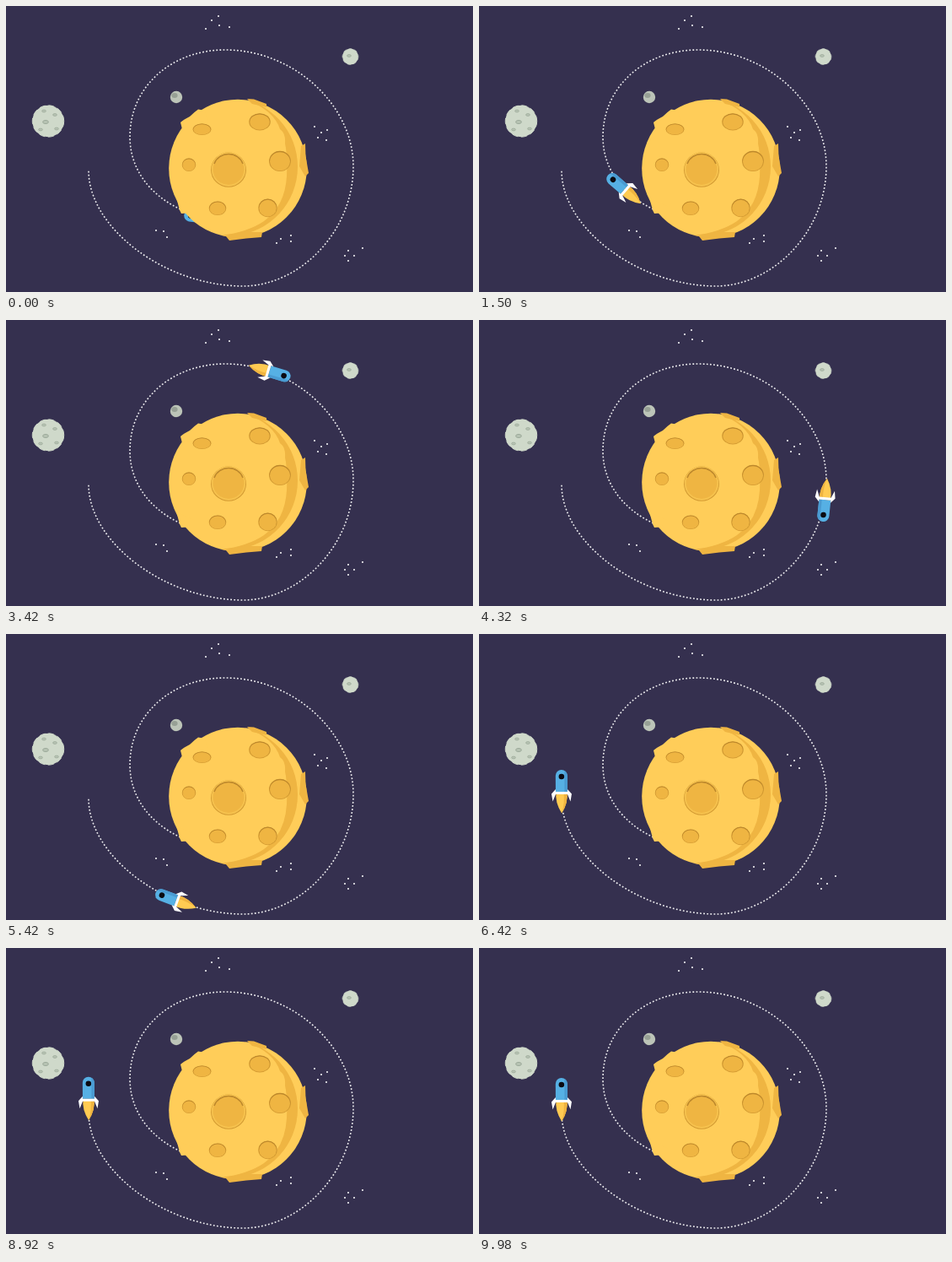
These frames come from a looping animation (554x339 px, 10 s). An HTML page:

```html
<!DOCTYPE html>
<html lang="en">
<head>
<meta charset="utf-8">
<title>Rocket orbit</title>
<style>
  html, body { margin: 0; width: 100%; height: 100%; overflow: hidden; background: #35304f; }
  svg { display: block; width: 100vw; height: 100vh; }
</style>
</head>
<body>
<svg viewBox="0 0 554 339">
  <defs>
    <g id="crater">
      <circle r="10" cy=".4" fill="#d39b33"/>
      <circle r="9.500" cy="-.2" fill="#bd882c"/>
      <circle r="9.200" cy=".6" fill="#efb542"/>
    </g>
    <ellipse id="pit" rx="2.400" ry="1.400" fill="#b9c5b5" stroke="#98a596" stroke-width=".7"/>
  </defs>
  <rect width="554" height="339" fill="#35304f"/>

  <g id="stars" stroke="#fff" stroke-width="2" stroke-linecap="round">
    <path d="M252 12h0M244 17h0M253 23h0M265 25h0M237 27h0"/>
    <path d="M366 143h0M381 147h0M374 150h0M370 156h0M380 159h0"/>
    <path d="M178 266h0M187 267h0M191 274h0"/>
    <path d="M338 272h0M326 276h0M338 279h0M321 281h0"/>
    <path d="M423 287h0M406 290h0M402 296h0M413 296h0M406 302h0"/>
  </g>

  <g id="moons" fill="#cfd9ca">
    <circle cx="50" cy="136.500" r="18.700" stroke="#cfd9ca" stroke-dasharray="7 4"/>
    <use href="#pit" x="45" y="124.500"/>
    <use href="#pit" x="58" y="129"/>
    <use href="#pit" transform="translate(47 137.500) scale(1.400)"/>
    <use href="#pit" x="41" y="146.500"/>
    <use href="#pit" x="60" y="145.500"/>
    <circle cx="408.500" cy="60" r="9.400" stroke="#cfd9ca" stroke-width=".7" stroke-dasharray="4 3"/>
    <use href="#pit" x="407" y="59"/>
    <circle cx="202" cy="108" r="7.200" fill="#bcc4b8"/>
    <ellipse cx="200" cy="106" rx="3.600" ry="3" fill="#97a095"/>
  </g>

  <path id="orbit" fill="none" stroke="#fff" stroke-opacity=".92" stroke-width="1.600" stroke-dasharray="1.800 2.300"
    d="M246 252C230 250 217 247 205 240C170 223 147 193 147 155C147 95 197 52 260 52
       C342 52 412 118 412 190C412 268 348 332 281 332C190 332 98 264 98 195"/>

  <g id="rocket">
    <path fill="#ffcb52" d="M-6.500 -8H6.500Q8 5 0 17.500Q-8 5 -6.500 -8Z"/>
    <path fill="#efb440" d="M2.500 -8H6.500Q8 5 0 17.500Q4 5 2.500 -8Z"/>
    <path fill="#56b0e4" d="M-7 -8V-27A7 7 0 0 1 7 -27V-8Z"/>
    <path fill="#4a9bd2" d="M3.500 -8V-33A7 7 0 0 1 7 -27V-8Z"/>
    <path fill="#fff" d="M-7 -11V-8H7V-11L12 -5.500L10.500 3.500L7 -5H-7L-10.500 3.500L-12 -5.500Z"/>
    <circle cy="-26" r="3.300" fill="#0b0b12"/>
  </g>

  <g id="planet">
    <circle cx="275" cy="192.500" r="81.800" fill="#ffcd59"/>
    <path fill="#ffcd59" d="M209 146L207 138Q210 135 218 131Q223 126 228 122.500L236 124L240 140Z
      M202 227L206 242L208 246L216 245.500L225 238Z"/>
    <path fill="#efb542" d="M286 111.500A82 82 0 0 1 255 272Q287 268 306 255Q331 237 333 202
      Q334 176 331 163Q332 151 325 146Q318 124 286 111.500Z"/>
    <path fill="#efb542" d="M286 110L294 110.500L309 116L309 120L292 116Z
      M350 166L355 163L355.500 178L359 198L355 202L348 190Z
      M304 268L303 274L285 275.500L265 278L261 273L280 268Z"/>
    <use href="#crater" transform="translate(232.500 146) scale(1.100 .670)"/>
    <use href="#crater" transform="translate(301 137) scale(1.280 1)"/>
    <use href="#crater" transform="translate(217 188) scale(.820 .770)"/>
    <use href="#crater" transform="translate(325 183.500) scale(1.300 1.200)"/>
    <use href="#crater" transform="translate(251 239.500) scale(1.030 .820)"/>
    <use href="#crater" transform="translate(310.500 239) scale(1.120 1.070)"/>
    <use href="#crater" transform="translate(264 193.500) scale(2.100 2.050)"/>
    <circle cx="264" cy="193.500" r="19.300" fill="none" stroke="#f6c24e" stroke-width="1.800"/>
    <path d="M247 187A18 17 0 0 1 281 187" fill="none" stroke="#bd882c" stroke-width="1.500"/>
  </g>
</svg>
<script>
const LOOP = 10000;
const FLIGHT = 6100;    // launch to the end of the orbit
const BOB_START = 6437, BOB_PERIOD = 1090, BOB_HEIGHT = 7;

const orbit = document.getElementById('orbit');
const rocket = document.getElementById('rocket');
const length = orbit.getTotalLength();

const sineIn = u => 1 - Math.cos(u * Math.PI / 2);

function bob(t) {
  const turns = Math.max(0, t - BOB_START) / BOB_PERIOD;
  return BOB_HEIGHT * (1 - Math.cos(turns * 2 * Math.PI));
}

function draw(now) {
  const t = now % LOOP;
  const distance = Math.max(1, length * sineIn(Math.min(1, t / FLIGHT)));
  const p = orbit.getPointAtLength(distance);
  const q = orbit.getPointAtLength(distance - 1);
  const angle = Math.atan2(p.y - q.y, p.x - q.x) * 180 / Math.PI + 90;
  rocket.setAttribute('transform', `translate(${p.x} ${p.y - bob(t)}) rotate(${angle})`);
  requestAnimationFrame(draw);
}
requestAnimationFrame(draw);
</script>
</body>
</html>
```
